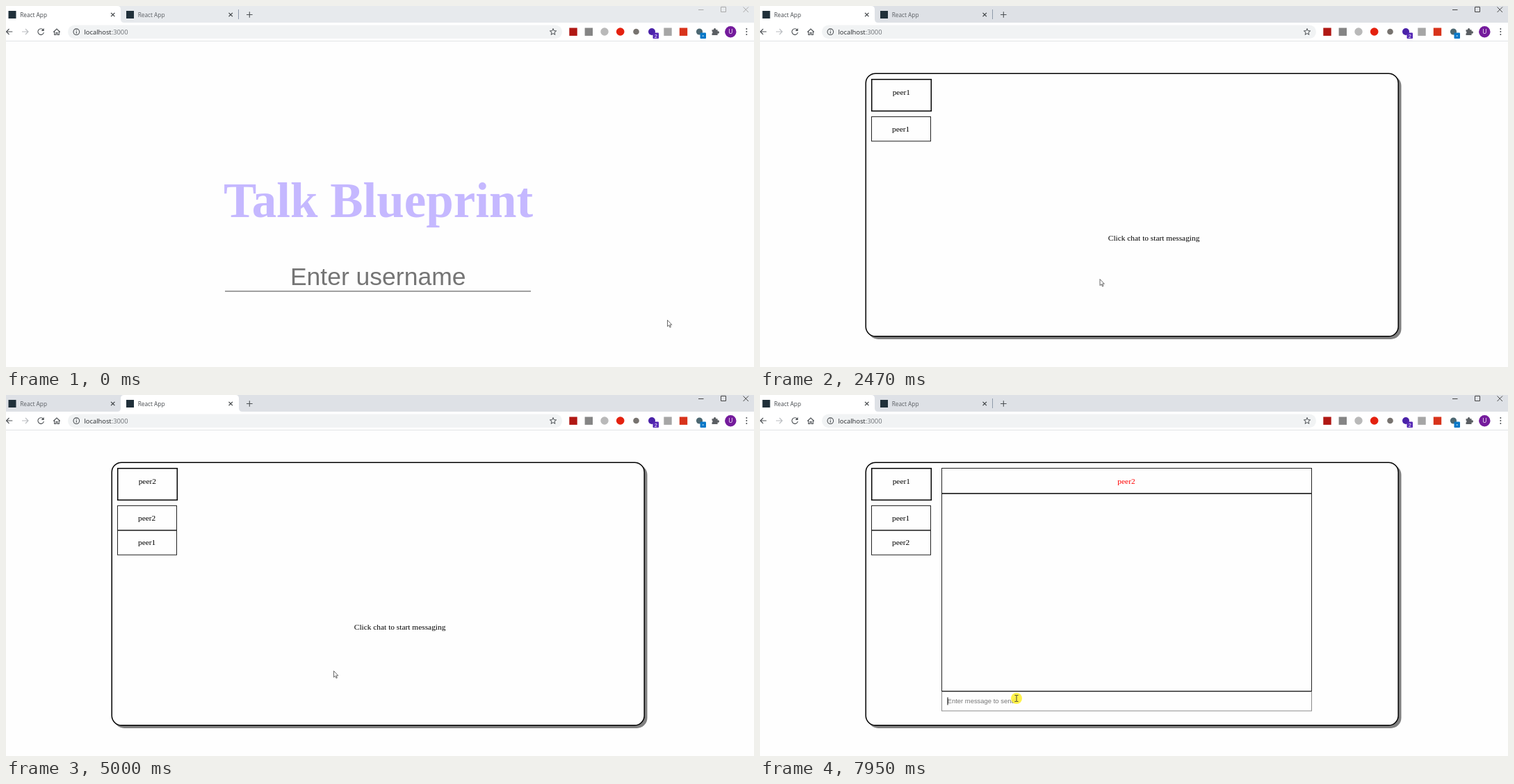
Recreate the animation shown at these times as an HTML page. Size 1076x520 px, loop 8000 ms.

```html
<!DOCTYPE html>
<html lang="en">
<head>
<meta charset="utf-8">
<title>Chat demo</title>
<style>
  html, body { margin: 0; width: 100%; height: 100%; overflow: hidden; background: #fefefe; }
  svg { display: block; width: 1076px; height: 520px; }
  text { white-space: pre; }
  .ui { font-family: "Open Sans", "Noto Sans", sans-serif; }
  .serif { font-family: "Liberation Serif", serif; font-size: 11.4px; }
  .sans { font-family: "Liberation Sans", sans-serif; }
  .mid { text-anchor: middle; }
  .line { fill: none; stroke: #4c5054; stroke-width: 1.1; }
</style>
</head>
<body>
<svg viewBox="0 0 1076 520">
  <defs>
    <radialGradient id="glow"><stop stop-color="#fff" stop-opacity=".75"/><stop offset="1" stop-color="#fff" stop-opacity="0"/></radialGradient>
  </defs>
  <g id="page"></g>
  <g id="tabs"></g>
  <g id="toolbar"></g>
  <g id="pointer"></g>
</svg>
<script>
const LOOP = 8000;
const FIRST = 'peer1', SECOND = 'peer2';
const $ = id => document.getElementById(id);

// Pointer waypoints: time, x, y
const PATH = [
  [30, 951, 452], [780, 62, 9], [920, 62, 9], [1460, 488.5, 393],
  [2740, 488.5, 393], [3170, 240, 7], [3520, 240, 7], [3830, 471, 397],
  [5280, 471, 397], [5710, 205, 212], [6060, 205, 212], [6540, 91, 32],
  [6770, 63, 5], [6940, 63, 5], [7460, 203, 213], [7690, 203, 213], [7930, 369, 437]
];
const CLICKS = [790, 1450, 3440, 3810, 5980, 6810, 7640, 7930];
const CLICK_MS = 110;
const TYPING = {
  1: { focus: 1450, keys: [1870, 1960, 2050, 2140, 2300], enter: 2470, name: FIRST },
  2: { focus: 3830, keys: [4240, 4330, 4450, 4570, 4800], enter: 4970, name: SECOND }
};
const ACTIVATE = 800, TO_SECOND = 3480, TO_FIRST = 6850;
const CHAT_OPEN = { 1: 7660, 2: 6010 };

const rect = (x, y, w, h, attrs = '') => `<rect x="${x}" y="${y}" width="${w}" height="${h}" ${attrs}/>`;
const circle = (x, y, r, attrs = '') => `<circle cx="${x}" cy="${y}" r="${r}" ${attrs}/>`;
const path = (d, attrs = 'class="line"') => `<path d="${d}" ${attrs}/>`;
const text = (s, x, y, cls, size, fill = '#000', extra = '') =>
  `<text x="${x}" y="${y}" class="${cls}" style="font-size:${size}px" fill="${fill}" ${extra}>${s}</text>`;
const cross = (x, y, r, color) =>
  path(`M${x - r} ${y - r}l${2 * r} ${2 * r}m0 ${-2 * r}l${-2 * r} ${2 * r}`, `fill="none" stroke="${color}" stroke-width="1.2"`);
const box = (x, y, w, h, width = 1, stroke = '#000', fill = 'none') =>
  rect(x, y, w, h, `fill="${fill}" stroke="${stroke}" stroke-width="${width}"`);

function pointerAt(t) {
  if (t <= PATH[0][0]) return PATH[0].slice(1);
  for (let i = 1; i < PATH.length; i++) {
    const [t0, x0, y0] = PATH[i - 1], [t1, x1, y1] = PATH[i];
    if (t < t1) {
      const u = (t - t0) / (t1 - t0), k = u * u * (3 - 2 * u);
      return [x0 + (x1 - x0) * k, y0 + (y1 - y0) * k];
    }
  }
  return PATH[PATH.length - 1].slice(1);
}

const inside = ([x, y], l, t, r, b) => x >= l && x <= r && y >= t && y <= b;

function tabShape(x, w) {
  const r = x + w;
  return `M${x - 5} 24Q${x} 24 ${x} 19V5Q${x} 0 ${x + 5} 0H${r - 5}Q${r} 0 ${r} 5V19Q${r} 24 ${r + 5} 24Z`;
}

function drawTabs(t, active, mouse) {
  const focused = t >= ACTIVATE;
  const shapes = [tabShape(-5, 170), tabShape(165, 170)];
  let out = rect(0, 0, 1076, 24, `fill="${focused ? '#dee1e6' : '#e7eaed'}"`);
  const hovered = mouse[1] < 24 && mouse[0] < 335 ? (mouse[0] < 165 ? 1 : 2) : 0;
  if (hovered && hovered !== active) {
    const i = hovered - 1;
    out += `<clipPath id="tabClip">${path(shapes[i], '')}</clipPath>` +
      circle(mouse[0], 12, 95, 'fill="url(#glow)" clip-path="url(#tabClip)"');
  }
  out += path(shapes[active - 1], 'fill="#fff"');
  [0, 169.5].forEach((dx, i) => {
    const color = i + 1 === active ? '#45494d' : '#5a5e63';
    out += rect(3.5 + dx, 7, 11, 11, 'fill="#20303a"') +
      text('React App', 20.2 + dx, 15.5, 'ui', 8.3, color) +
      cross(153.7 + dx, 12.5, 2.7, '#3c4043');
  });
  if (active === 1) out += path('M334.5 5V19', 'stroke="#8f9aaa"');
  out += path('M346 12.5H354.6M350.3 8.2V16.8');
  const win = focused ? '#444' : '#aaa';
  out += path('M996 5.5H1003.5M1028.5 1.5H1035.5V8.5H1028.5Z', `fill="none" stroke="${win}"`) +
    path('M1060.5 1.5L1068 9M1068 1.5L1060.5 9', `stroke="${win}"`);
  $('tabs').innerHTML = out;
}

function toolbar() {
  let out = rect(0, 24, 1076, 26, 'fill="#fff"') + rect(0, 50, 1076, 1, 'fill="#e1e3e5"') +
    rect(89, 27.5, 711, 19.5, 'rx="9.75" fill="#f1f3f4"') +
    circle(101, 37, 9.5, 'id="infoHover" fill="#dfe1e4"') +
    path('M9.3 37H.7M4.5 33L.6 37L4.5 41') +
    path('M23 37H32M28 33L32 37L28 41', 'fill="none" stroke="#b9bcc0" stroke-width="1.1"') +
    path('M53.6 34.4A4.3 4.3 0 1 0 54.4 38') + path('M54.6 32V36H50.6Z', 'fill="#4c5054"') +
    path('M68.3 37.5L73 33L77.7 37.5M69.7 36.5V41.5H72V38.5H74V41.5H76.3V36.5') +
    circle(101.3, 37.2, 4.3, 'class="line"') + path('M101.3 36.5V39.7M101.3 34.5V35.6') +
    text('localhost<tspan fill="#6a6e73">:3000</tspan>', 112.5, 40.8, 'ui', 9.35, '#26292c');
  let star = '';
  for (let i = 0; i < 10; i++) {
    const r = i % 2 ? 2.1 : 4.9, a = i * Math.PI / 5;
    star += `${i ? 'L' : 'M'}${787 + r * Math.sin(a)} ${37.4 - r * Math.cos(a)}`;
  }
  out += path(star + 'Z', 'fill="none" stroke="#4c5054"');
  const squares = [[816, '#b01814'], [838.3, '#858585'], [952, '#a6a6a6'], [974.5, '#d8331b']];
  const dots = [[861, '#b9b9b9', 5.7], [883.7, '#e4210f', 5.8], [906.5, '#77736f', 4.3], [929, '#4a22a8', 5], [997.5, '#4d6872', 4.6]];
  squares.forEach(([x, c]) => out += rect(x - 5.7, 31.5, 11.4, 11.4, `fill="${c}"`));
  dots.forEach(([x, c, r]) => out += circle(x, 37, r, `fill="${c}"`));
  out += rect(930.5, 38.5, 8.5, 8.5, 'rx="1" fill="#5527b5"') + text('2', 934.8, 45.5, 'sans mid', 7.5, '#fff') +
    rect(998.5, 38.5, 8.5, 8.5, 'rx="1" fill="#0878c8"') + rect(1001.7, 42.5, 2, 1, 'fill="#fff"') +
    path('M1015.5 34.3H1018A1.7 1.7 0 1 1 1021.2 34.3H1023.6V36.4A1.7 1.7 0 1 1 1023.6 39.5V42H1015.5V39.5A1.7 1.7 0 0 0 1015.5 36.4Z', 'fill="#5b5f63"') +
    circle(1042.3, 37.3, 8.2, 'fill="#741b9c"') + text('U', 1042.3, 40.3, 'ui mid', 8.5, '#fff');
  [33, 37, 41].forEach(y => out += circle(1065.3, y, 1, 'fill="#4c5054"'));
  $('toolbar').innerHTML = out;
}

function loginPage(t, { focus, keys, name }) {
  const typed = name.slice(0, keys.filter(k => t >= k).length);
  const out = text('Talk Blueprint', 535.5, 304, 'serif mid', 71, '#c5b8ff', 'font-weight="700"') +
    text(typed || 'Enter username', 535.2, 401.5, 'sans mid', 35.5, typed ? '#000' : '#757575', 'id="field"') +
    rect(315, 410.4, 440, 1, 'fill="#444"');
  $('page').innerHTML = out;
  if (t >= focus) {
    const half = typed ? $('field').getComputedTextLength() / 2 : 0;
    $('page').innerHTML += rect(535 + half, 369, 1, 40, 'fill="#333"');
  }
}

function chatPage(t, tab, mouse) {
  const me = tab === 1 ? FIRST : SECOND, other = tab === 1 ? SECOND : FIRST;
  const people = t >= TYPING[2].enter ? [me, other] : [me];
  let out = rect(155, 100, 767.5, 380, 'rx="15" fill="#808080"') +
    rect(152.2, 97.2, 766, 378.6, 'rx="14" fill="#fefefe" stroke="#000" stroke-width="1.5"') +
    box(160.7, 105.7, 85.6, 45.6, 1.5) + text(me, 203.3, 127.5, 'serif mid', 11.4);
  people.forEach((name, i) => {
    const y = 159.5 + 35.6 * i;
    const hover = inside(mouse, 160, y, 246, y + 35);
    out += box(160.5, y, 85, 35.2, 1, '#222', hover ? '#d3d3d3' : 'none') +
      text(name, 202.6, y + 21.3, 'serif mid', 11.4);
  });
  if (t >= CHAT_OPEN[tab]) {
    out += box(261.5, 105.5, 532, 36, 1, '#222') + box(261.5, 142.2, 532, 284.3, 1, '#222') +
      text(other, 527, 127.5, 'serif mid', 11.4, '#f00') +
      box(261.5, 427.3, 532, 27.7, 1, '#8a8a8a') + rect(261, 426, 533, 1, 'fill="#222"') +
      text('Enter message to send', 269.6, 444, 'sans', 9.45, '#757575');
    if (tab === 1 && t >= 7930) out += rect(269.5, 435.5, 1, 11, 'fill="#000"');
  } else {
    out += text('Click chat to start messaging', 566.6, 337.5, 'serif mid', 11.4);
  }
  $('page').innerHTML = out;
}

function drawPointer(t, mouse, overField) {
  const [x, y] = mouse;
  let out = '';
  if (CLICKS.some(c => t >= c && t < c + CLICK_MS)) out += circle(x, y, 8, 'fill="#fff02a" fill-opacity=".85"');
  const shape = overField
    ? path('M-2.5 -4.5H-.7L0 -4L.7 -4.5H2.5M0 -4V4M-2.5 4.5H-.7L0 4L.7 4.5H2.5', 'fill="none" stroke="#333" stroke-width=".9"')
    : path('M.5 .5V9.6L2.6 7.7L4 11L5.4 10.4L4 7.2H6.8Z', 'fill="#fff" stroke="#444" stroke-width=".8"');
  $('pointer').innerHTML = out + `<g transform="translate(${x} ${y})">${shape}</g>`;
}

function draw(t) {
  const mouse = pointerAt(t);
  const active = t >= TO_SECOND && t < TO_FIRST ? 2 : 1;
  const login = t < TYPING[active].enter;
  const chatting = !login && t >= CHAT_OPEN[active];
  if (login) loginPage(t, TYPING[active]); else chatPage(t, active, mouse);
  drawTabs(t, active, mouse);
  $('infoHover').setAttribute('opacity', inside(mouse, 90, 27, 112, 47) ? 1 : 0);
  const overField = login && inside(mouse, 315, 367, 755, 411) || chatting && inside(mouse, 262, 427, 794, 455);
  drawPointer(t, mouse, overField);
}

toolbar();
const start = performance.now();
function tick() {
  draw((performance.now() - start) % LOOP);
  requestAnimationFrame(tick);
}
tick();
</script>
</body>
</html>
```
